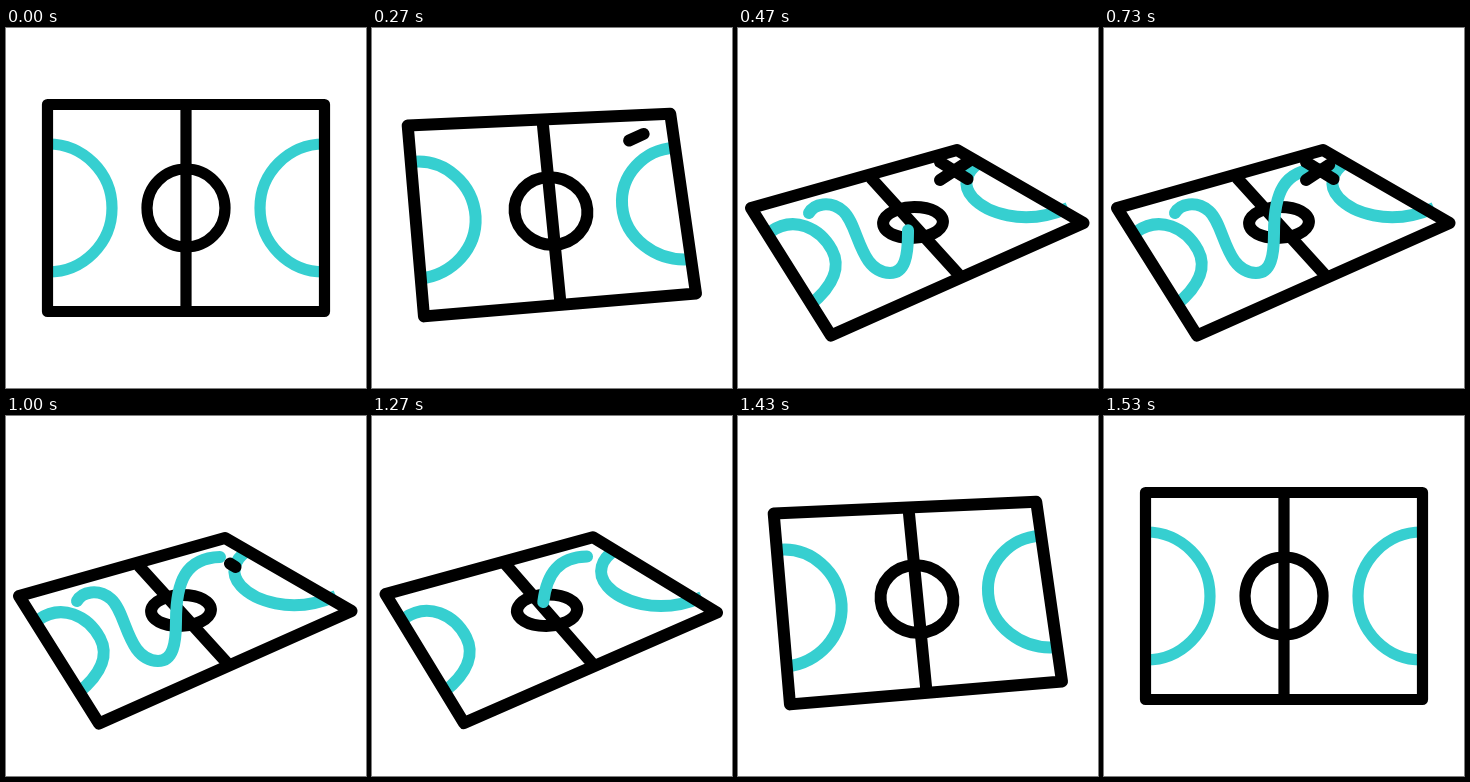
An HTML page for the animation above (1.67 s loop, 360 by 360 pixels).

```html
<!DOCTYPE html>
<html lang="en">
<head>
<meta charset="utf-8">
<title>Court tactics</title>
<style>
  html, body { margin: 0; width: 100%; height: 100%; overflow: hidden; background: #fff; }
  svg { display: block; width: 100%; height: 100%; }
  path { fill: none; stroke: #000; stroke-linejoin: round; }
  .teal { stroke: #36cfd0; }
  .pen { stroke-linecap: round; }
</style>
</head>
<body>
<svg viewBox="0 0 360 360">
  <path id="left" class="teal"/>
  <path id="right" class="teal"/>
  <path id="court"/>
  <path id="ring"/>
  <path id="route" class="teal pen" pathLength="1"/>
  <path id="slash" class="pen" pathLength="1"/>
  <path id="back" class="pen" pathLength="1"/>
</svg>
<script>
const LOOP = 1670, TICKS_PER_MS = 0.03;
const $ = id => document.getElementById(id);
const clamp = v => Math.min(1, Math.max(0, v));
const span = (n, a, b) => clamp((n - a) / (b - a));

// cubic-bezier(.5, 0, .5, 1)
function ease(x) {
  let lo = 0, hi = 1;
  for (let i = 0; i < 24; i++) {
    const s = (lo + hi) / 2;
    if (1.5 * s * (1 - s) + s ** 3 < x) lo = s; else hi = s;
  }
  return lo * lo * (3 - 2 * lo);
}

// Each shape: [flat pose, tilted pose]
const shapes = {
  court: [
    'M41.5 76.5 L318.5 76.5 L318.5 283.5 L41.5 283.5 Z M180 77 L180 283',
    'M13 180 L219 122 L345.5 195 L93 307.5 Z M133 150 L222 248'
  ],
  left: [
    'M42 116 C77.3 116 106 144.7 106 180 C106 215.3 77.3 244 42 244',
    'M32 204 C56 187 82 200 94 222 C102 237 98 256 72 277'
  ],
  right: [
    'M318 116 C282.7 116 254 144.7 254 180 C254 215.3 282.7 244 318 244',
    'M241 135 C229 143 223 157 235 170 C247 183 284 200 330 180'
  ],
  slash: ['M282 99 L244 115', 'M231 133 L202 152'],
  back: ['M262 84 L264 130', 'M202 134 L229.5 151']
};

// The route lies on the court plane, so its flat pose is the untilted one
const route = 'M71 185 C76 176 92 172 105 183 C121 197 121 244 152 245 ' +
  'C167 245 170 228 170 205 C170 165 180 142 214 141';
const flatten = d => d.replace(/([\d.]+) ([\d.]+)/g, (_, x, y) => {
  const u = x - 171, v = y - 200;
  return `${180 + 0.875 * u - 0.901 * v} ${180 + 0.556 * u + 1.498 * v}`;
});
shapes.route = [flatten(route), route];

function mix(a, b, p) {
  const to = b.match(/[\d.]+/g);
  let i = 0;
  return a.replace(/[\d.]+/g, v => (+v + (to[i++] - v) * p).toFixed(2));
}

function trim(id, from, to) {
  const s = $(id).style;
  s.display = to > from ? '' : 'none';
  s.strokeDasharray = `${to - from} 3`;
  s.strokeDashoffset = -from;
}

const K = 0.5523;
const circle = [[1, 0], [1, K], [K, 1], [0, 1], [-K, 1], [-1, K], [-1, 0],
  [-1, -K], [-K, -1], [0, -1], [K, -1], [1, -K], [1, 0]];

function ringPath(p) {
  const lerp = (a, b) => a + (b - a) * p;
  const cx = lerp(180, 175), cy = lerp(180, 194.5);
  const pts = circle.map(([x, y]) => [
    cx + 39 * (x * lerp(1, 0.66) + y * lerp(0, 0.39)),
    cy + 39 * (x * lerp(0, -0.22) + y * lerp(1, 0.33))
  ].map(v => v.toFixed(2)).join(' '));
  return `M${pts[0]} C${pts.slice(1).join(' ')}Z`;
}

function draw() {
  const n = Math.floor((performance.now() % LOOP + 4) * TICKS_PER_MS);
  const p = ease(span(n, 5, 14)) - ease(span(n, 37, 46));
  const width = 11.2 + 0.8 * clamp(p * 5);

  for (const id in shapes) $(id).setAttribute('d', mix(...shapes[id], p));
  $('ring').setAttribute('d', ringPath(p));
  document.querySelectorAll('path').forEach(el => el.style.strokeWidth = width);

  trim('slash', span(n, 21, 26), span(n, 6, 11));
  trim('back', span(n, 26, 31), span(n, 10, 14));
  trim('route', span(n, 30, 41), span(n, 8, 17));
  requestAnimationFrame(draw);
}
draw();
</script>
</body>
</html>
```
